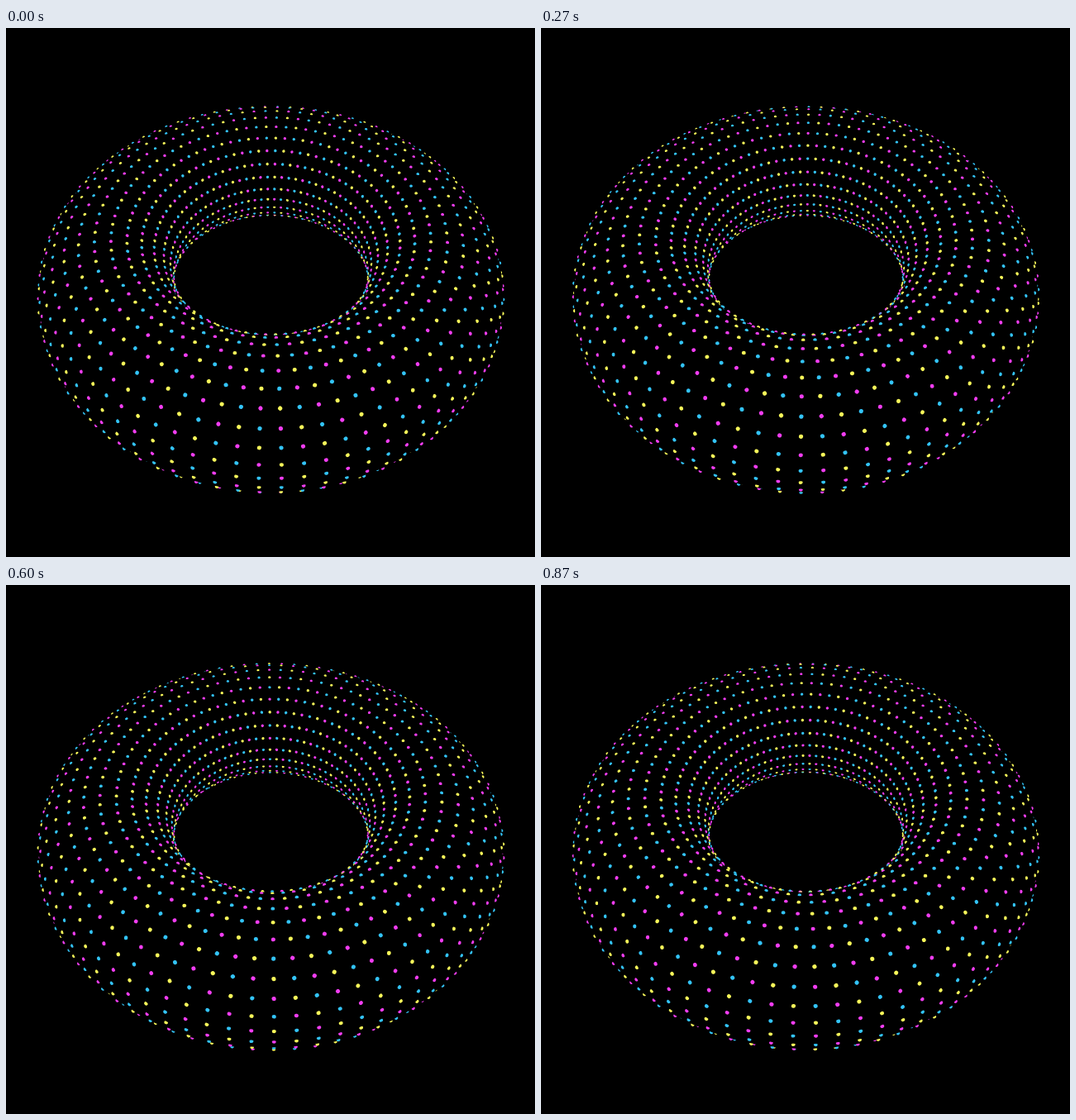
Recreate the animation shown at these times as an HTML page with a canvas. Size 640 px wide and 640 px high, loop 900 ms.

```html
<!DOCTYPE html>
<html lang="en">
<head>
<meta charset="utf-8">
<title>Dotted torus</title>
<style>
  html, body { margin: 0; width: 100%; height: 100%; overflow: hidden; background: #000; }
  canvas { display: block; width: 640px; height: 640px; }
</style>
</head>
<body>
<canvas id="stage" width="640" height="640"></canvas>
<script>
const ctx = document.getElementById('stage').getContext('2d');
const LOOP = 900, STEP = 30, TAU = Math.PI * 2, RIGHT = Math.PI / 2;
const COLS = 84, ROWS = 28, FIRST_ROW = -6;
const COLORS = ['#f23df2', '#f8f85a', '#33c4f8'];

// Lengths are in tube radii; the ring's centre sits LIFT above the optical axis.
const RING = 2.578, DIST = 8.566, LIFT = 0.467, TILT = 0.908;
const FOCAL = 640, CX = 320.5, CY = 320, DOT = 0.0245;
const SIN = Math.sin(TILT), COS = Math.cos(TILT);

// Turn ring coordinates into camera axes: right, up, towards the viewer.
const toCamera = (x, z, h) => [x, h * COS - z * SIN, z * COS + h * SIN];

// A dot is a small ball half sunk into the opaque tube.
function drawDot(u, v, color) {
  const su = Math.sin(u), cu = Math.cos(u);
  const sv = Math.sin(v), cv = Math.cos(v);
  const rho = RING + cv;
  const [x, y0, w] = toCamera(rho * su, rho * cu, sv);
  const [nx, ny, nw] = toCamera(cv * su, cv * cu, sv);

  const y = y0 + LIFT, depth = DIST - w;
  const len = Math.hypot(x, y, depth);
  const facing = (nw * depth - nx * x - ny * y) / len;
  const sunk = facing * facing / 2 / DOT;
  if (facing < 0 && sunk >= 1) return;

  const k = FOCAL / depth, r = DOT * k;
  const px = CX + x * k, py = CY - y * k;
  const out = Math.atan2(-(ny + facing * y / len), nx + facing * x / len);
  ctx.fillStyle = color;
  ctx.beginPath();
  if (facing > 0) {
    ctx.arc(px, py, r, out - RIGHT, out + RIGHT);
    ctx.ellipse(px, py, r * facing, r, out, RIGHT, 3 * RIGHT);
  } else {
    // Behind the rim only the cap that rises above it shows.
    const cap = Math.acos(sunk);
    ctx.arc(px, py, r, out - cap, out + cap);
  }
  ctx.fill();
}

function render(ms) {
  const t = Math.floor((ms % LOOP) / STEP) * STEP / LOOP;
  ctx.fillStyle = '#000';
  ctx.fillRect(0, 0, 640, 640);
  for (let row = FIRST_ROW; row < FIRST_ROW + ROWS; row++) {
    const v = (row + 0.16 + 2 * t) / ROWS * TAU;
    for (let col = 0; col < COLS; col++) {
      const u = (col + 0.47 + t) / COLS * TAU;
      drawDot(u, v, COLORS[(col + row + 8) % 3]);
    }
  }
}

let start;
function tick(now) {
  if (start === undefined) start = now;
  render(Math.max(0, now - start));
  requestAnimationFrame(tick);
}
render(0);
requestAnimationFrame(tick);
</script>
</body>
</html>
```
